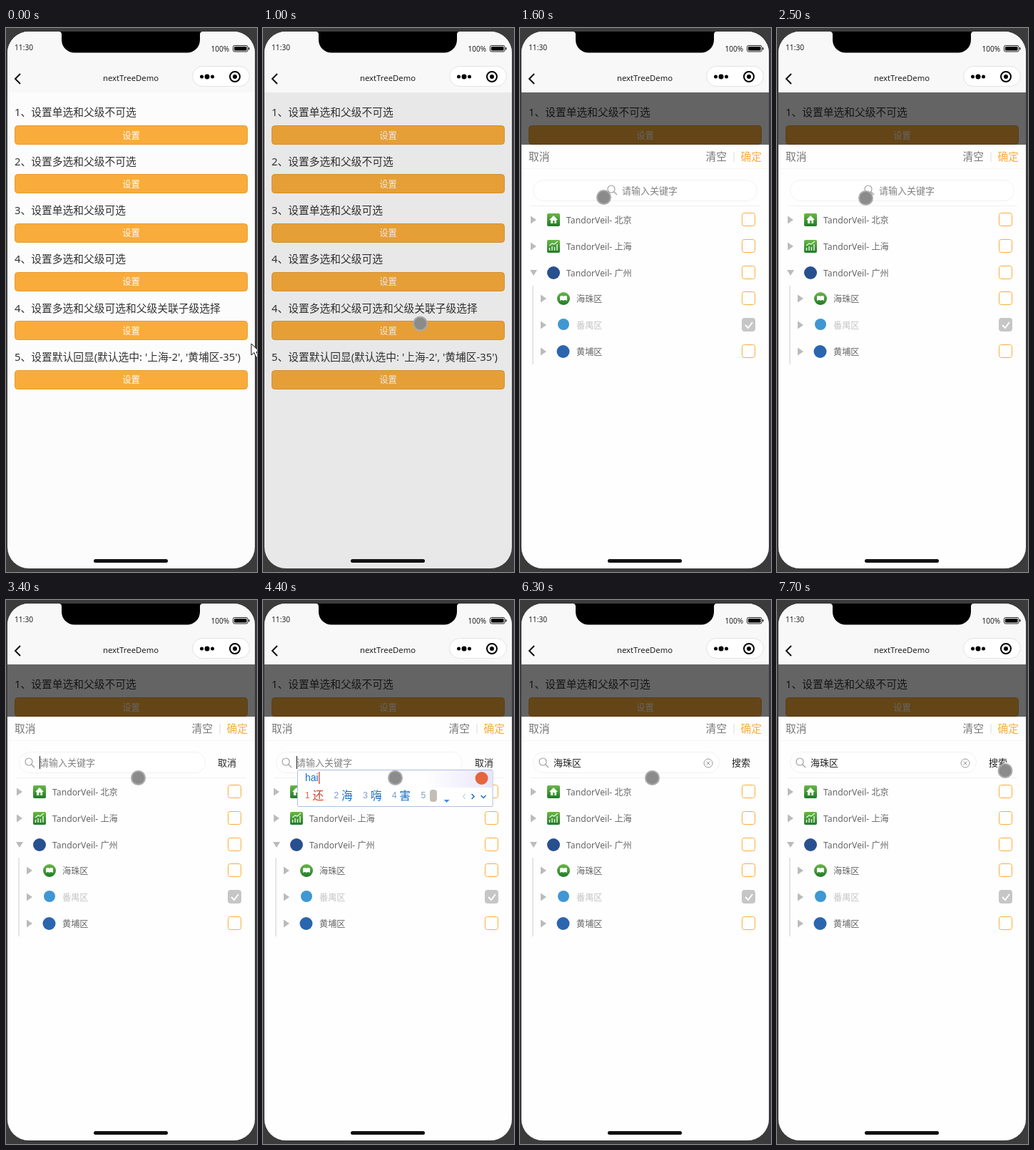
Recreate the animation shown at these times as an HTML page. Size 352 px wide and 760 px high, loop 8000 ms.

```html
<!DOCTYPE html>
<html lang="zh-CN">
<head>
<meta charset="utf-8">
<style>
  html, body { margin: 0; width: 100%; height: 100%; overflow: hidden; background: #3b3b3b; }
  svg { display: block; width: 352px; height: 760px; }
  text { font-family: "Noto Sans", "Noto Sans CJK SC", "Noto Sans CJK", sans-serif; white-space: pre; }
  .ime text { font-family: "Liberation Sans", "Noto Sans CJK SC", "Noto Sans CJK", sans-serif; }
</style>
</head>
<body>
<svg id="stage" viewBox="0 0 352 760"></svg>
<script>
const ORANGE = '#f9ac3b', LEAF = 'url(#leaf)', LOOP = 8000, STEP = 100;

// cy is the middle of the line of text
const text = (x, cy, size, str, fill = '#333', anchor = 'start') =>
  `<text x="${x}" y="${cy + size * 0.37}" font-size="${size}" fill="${fill}" text-anchor="${anchor}">${str}</text>`;
const rect = (x, y, w, h, r, fill, stroke = 'none') =>
  `<rect x="${x}" y="${y}" width="${w}" height="${h}" rx="${r}" fill="${fill}" stroke="${stroke}"/>`;
const disc = (x, y, r, fill, stroke = 'none', width = 1) =>
  `<circle cx="${x}" cy="${y}" r="${r}" fill="${fill}" stroke="${stroke}" stroke-width="${width}"/>`;
const path = (d, stroke, width = 1, fill = 'none') =>
  `<path d="${d}" stroke="${stroke}" stroke-width="${width}" fill="${fill}"/>`;
const group = (id, body) => `<g id="${id}">${body}</g>`;

const titles = [
  '1、设置单选和父级不可选', '2、设置多选和父级不可选', '3、设置单选和父级可选',
  '4、设置多选和父级可选', '4、设置多选和父级可选和父级关联子级选择',
  "5、设置默认回显(默认选中: '上海-2', '黄埔区-35')"
];
const page = titles.map((title, i) => {
  const y = 118 + i * 68.3;
  return text(12, y, 14.75, title) +
    rect(12.5, Math.round(y + 18) + 0.5, 326, 26, 4, ORANGE, '#e39c33') +
    text(175.5, y + 32, 12.3, '设置', '#fff', 'middle');
}).join('');

const header = rect(0, 0, 352, 90, 0, '#f8f8f8') +
  text(12, 27.5, 10.2, '11:30', '#222') +
  text(313, 29.5, 10, '100%', '#222', 'end') +
  rect(318.5, 24.5, 20.5, 8.5, 2, 'none', '#222') + rect(320, 26, 17.5, 5.5, 1, '#000') +
  rect(340, 27, 1.5, 3.5, 0.7, '#222') +
  path('M20 64l-7 7 7 7', '#111', 2) +
  text(175, 70, 11.3, 'nextTreeDemo', '#222', 'middle') +
  rect(261.5, 53.5, 80, 28, 14, '#fff', '#e2e2e2') +
  disc(274.5, 68, 2.5, '#000') + disc(282, 68, 3.5, '#000') + disc(289.5, 68, 2.5, '#000') +
  disc(321, 68, 7, 'none', '#000', 2) + disc(321, 68, 3, '#000');

const notch = '<path d="M74 5q4 0 4 4v7.500a18 18 0 0 0 18 18h158a18 18 0 0 0 18-18V9q0-4 4-4z"/>';

const icons = {
  house: y => rect(38, y - 9, 18, 18, 2, LEAF) +
    path(`M47 ${y - 6}l-6 6h2v5h8v-5h2z`, 'none', 0, '#fff') + rect(46, y + 1, 2.5, 4, 0, '#4aa53a'),
  chart: y => rect(38, y - 9, 18, 18, 2, LEAF) +
    path(`M41.5 ${y + 6}v-4m3.5 4v-6m3.5 6v-5m3.5 5v-9M41 ${y - 1}l4-3 3 1 5-4`, '#dff2d8', 1.5),
  book: y => disc(61, y, 9, LEAF) + path(`M56 ${y - 3}q3-2 5 0q2-2 5 0v6q-3-2-5 0q-2-2-5 0z`, 'none', 0, '#fff'),
  badge: y => disc(47, y, 9, '#28508f'),
  sky: y => disc(61, y - 1, 8, '#3f97d3'),
  blue: y => disc(60.5, y, 9, '#2a65ae')
};
const rows = [
  ['house', 'TandorVeil- 北京'], ['chart', 'TandorVeil- 上海'], ['badge', 'TandorVeil- 广州'],
  ['book', '海珠区'], ['sky', '番禺区'], ['blue', '黄埔区']
];
const tree = rows.map(([icon, label], i) => {
  const y = Math.round(268 + i * 36.8), child = i > 2, off = i === 4, x = child ? 29 : 15;
  const arrow = i === 2 ? `M14 ${y - 4}h10l-5 8z` : `M${x} ${y - 5.5}v11l8-5.5z`;
  return path(arrow, 'none', 0, '#bbb') +
    `<g class="${i > 3 ? 'late' : ''}">${icons[icon](y)}</g>` +
    text(child ? 79 : 65, y + 0.5, 12.2, label, off ? '#c4c4c4' : '#666') +
    rect(311.5, y - 9.5, 18, 18, 3, off ? '#c6c6c6' : '#fff', off ? '#c6c6c6' : ORANGE) +
    (off ? path(`M316 ${y}l4 4 6-8`, '#fff', 2) : '');
}).join('');

const lens = (x, y) => disc(x, y, 5, 'none', '#999', 1.1) + path(`M${x + 3.5} ${y + 3.5}l4.5 4.5`, '#999', 1.1);
const HINT = '请输入关键字';
const popup = rect(0, 163, 352, 600, 0, '#fefefe') +
  text(12, 180, 14.75, '取消', '#777') + text(260.5, 180, 14.75, '清空', '#777') +
  path('M300 173v14', '#ddd') + text(309.5, 180, 14.75, '确定', ORANGE) +
  path('M3 196.5h346', '#f6f6f6') + path('M15 248.5h322', '#f0f0f0') +
  group('idle', rect(18.5, 212.5, 314, 29, 14.5, '#fff', '#f1f1f1') + lens(128, 225) + text(143, 227, 13, HINT, '#808080')) +
  group('focus', rect(18.5, 212.5, 261, 29, 14.5, '#fff', '#f1f1f1') + lens(32, 226) +
    group('hint', text(47, 227, 13, HINT, '#808080') + text(297, 227, 13, '取消', '#222')) +
    group('filled', text(47, 227, 13, '海珠区', '#222') + text(297, 227, 13, '搜索', '#222') +
      disc(264, 228, 6, 'none', '#999') + path('M261.5 225.5l5 5m0-5l-5 5', '#999')) +
    '<rect id="caret" y="218" width="1" height="18" fill="#111"/>') +
  path('M18 360v110', '#ddd', 1.5) + tree;

const stage = document.getElementById('stage');
stage.innerHTML = `<defs><clipPath id="screen">${rect(2, 5, 347, 750, 30, '#000')}</clipPath>
  <linearGradient id="leaf" x2="0" y2="1"><stop stop-color="#6ab848"/><stop offset="1" stop-color="#1f7a28"/></linearGradient>
  <linearGradient id="glow"><stop offset=".65" stop-color="#fff"/><stop offset="1" stop-color="#e9e6fa"/></linearGradient></defs>` +
  rect(0, 0, 352, 760, 0, '#3b3b3b') +
  `<g clip-path="url(#screen)">${rect(0, 0, 352, 760, 0, '#fcfcfc')}${page}
    <rect id="mask" y="90" width="352" height="670"/>${group('popup', popup)}${header}${notch}</g>` +
  rect(123, 742, 104, 5, 2.5, '#111') +
  '<g id="ime" class="ime"></g>' +
  group('arrow', path('M344 441v16l4-3.5 3 7 3-1.500-3-6.500h5z', '#111', 1, '#fff')) +
  group('touch', disc(0, 0, 9.5, '#8b8b8b', '#aaa', 2));

const $ = id => document.getElementById(id);
const show = (id, on) => $(id).setAttribute('visibility', on ? 'inherit' : 'hidden');

// linear interpolation through [time, ...values]
function along(keys, t) {
  const i = keys.findIndex(k => k[0] > t);
  if (i < 0) return keys[keys.length - 1].slice(1);
  if (!i) return keys[0].slice(1);
  const a = keys[i - 1], b = keys[i], f = (t - a[0]) / (b[0] - a[0]);
  return a.slice(1).map((v, j) => v + (b[j + 1] - v) * f);
}

const pointer = [
  [100, 339, 447], [300, 300, 454], [800, 220.5, 413], [1200, 220.5, 413], [1600, 117.5, 236.5],
  [1800, 117.5, 236.5], [2000, 117.5, 240], [2200, 117.5, 240], [2500, 124.5, 237.5], [2700, 124.5, 237.5],
  [3000, 180, 234], [3400, 185.5, 248.5], [7100, 185.5, 248.5], [7200, 193, 248.5], [7300, 193, 248.5],
  [7400, 240, 241], [7500, 338, 228], [7600, 332, 234], [7700, 320, 238.5]
];
const slide = [[1000, 597], [1100, 480], [1200, 153], [1300, 30], [1400, 0]];
const dim = [[900, 0], [1000, 0.08], [1200, 0.42], [1400, 0.6]];

// '*' is a picture candidate
const typing = [
  [4100, 'h', '和 会 好 后 还'], [4200, 'ha', '哈 蛤 铪 还 海'], [4400, 'hai', '还 海 嗨 害 *'],
  [4900, "hai'z", '孩子 还在 还真 海战 还'], [5100, "hai'zh", '还真 海战 还找 海珠 还'],
  [5200, "hai'zhu", '海珠 还住 海柱 孩柱 还'], [5500, "hai'zhu'q", '海珠区 海珠 还住 海柱 还'],
  [5600, "hai'zhu'qu", '海珠区 海珠 还住 海柱 还'], [5800, '', '']
];

let typed = '';
function drawIme(keys, words) {
  if (keys === typed) return;
  typed = keys;
  if (!keys) return void ($('ime').innerHTML = '');
  let x = 59, end = 0, list = '';
  words.split(' ').forEach((word, i) => {
    list += text(x, 273, 12, i + 1, i ? '#7d9cc4' : '#e0604c');
    const wx = x + 10.5;
    end = wx + word.length * 15.7;
    if (word === '*') {
      list += rect(wx + 2, 265, 10, 17, 4, '#c3bdb5') + path(`M${end + 6} 279h8l-4 4z`, 'none', 0, '#4a8fd8');
      end += 13;
    } else list += text(wx, 273, 15.7, word, i ? '#1a6fc4' : '#e03c28');
    x = end + 14.4;
  });
  const right = end + 61;
  $('ime').innerHTML = rect(48.5, 237.5, right - 48, 51, 1, '#fff', '#a9c0e0') +
    rect(49, 238, right - 49, 24, 0, 'url(#glow)') +
    group('keys', text(59, 248, 14, keys, '#1a6fc4')) + '<rect id="bar" y="240" width="1.3" height="17" fill="#e03c28"/>' +
    disc(right - 15, 249, 9, '#e5653c') + list +
    path(`M${end + 23} 271l-3 3.500 3 3.500`, '#c5d3e6', 1.2) +
    path(`M${end + 32} 271l3.500 3.500-3.500 3.500`, '#1a6fc4', 1.5) +
    path(`M${end + 45} 273l3.500 3.500 3.500-3.500`, '#1a6fc4', 1.5);
  $('bar').setAttribute('x', 59.5 + $('keys').firstChild.getComputedTextLength());
}

function draw(t) {
  const [x, y] = along(pointer, t);
  $('touch').setAttribute('transform', `translate(${x} ${y})`);
  show('touch', t >= 100);
  show('arrow', t < 100);
  $('mask').setAttribute('opacity', along(dim, t)[0]);
  $('popup').setAttribute('transform', `translate(0 ${along(slide, t)[0]})`);
  document.querySelectorAll('.late').forEach(g => g.setAttribute('opacity', t < 1400 ? 0 : 1));

  const focused = t >= 3100, filled = t >= 5800;
  show('idle', !focused);
  show('focus', focused);
  show('hint', focused && !filled);
  show('filled', filled);
  const blink = t < 3600 || (t >= 4100 && t < 6300) || (t >= 6800 && t < 7400);
  show('caret', focused && blink);
  $('caret').setAttribute('x', filled ? 86 : 47);

  const entry = typing.filter(e => e[0] <= t).pop();
  drawIme(entry ? entry[1] : '', entry ? entry[2] : '');
}

const start = performance.now();
function tick() {
  const t = (performance.now() - start) % LOOP;
  draw(Math.floor(t / STEP) * STEP);
  requestAnimationFrame(tick);
}
tick();
</script>
</body>
</html>
```
